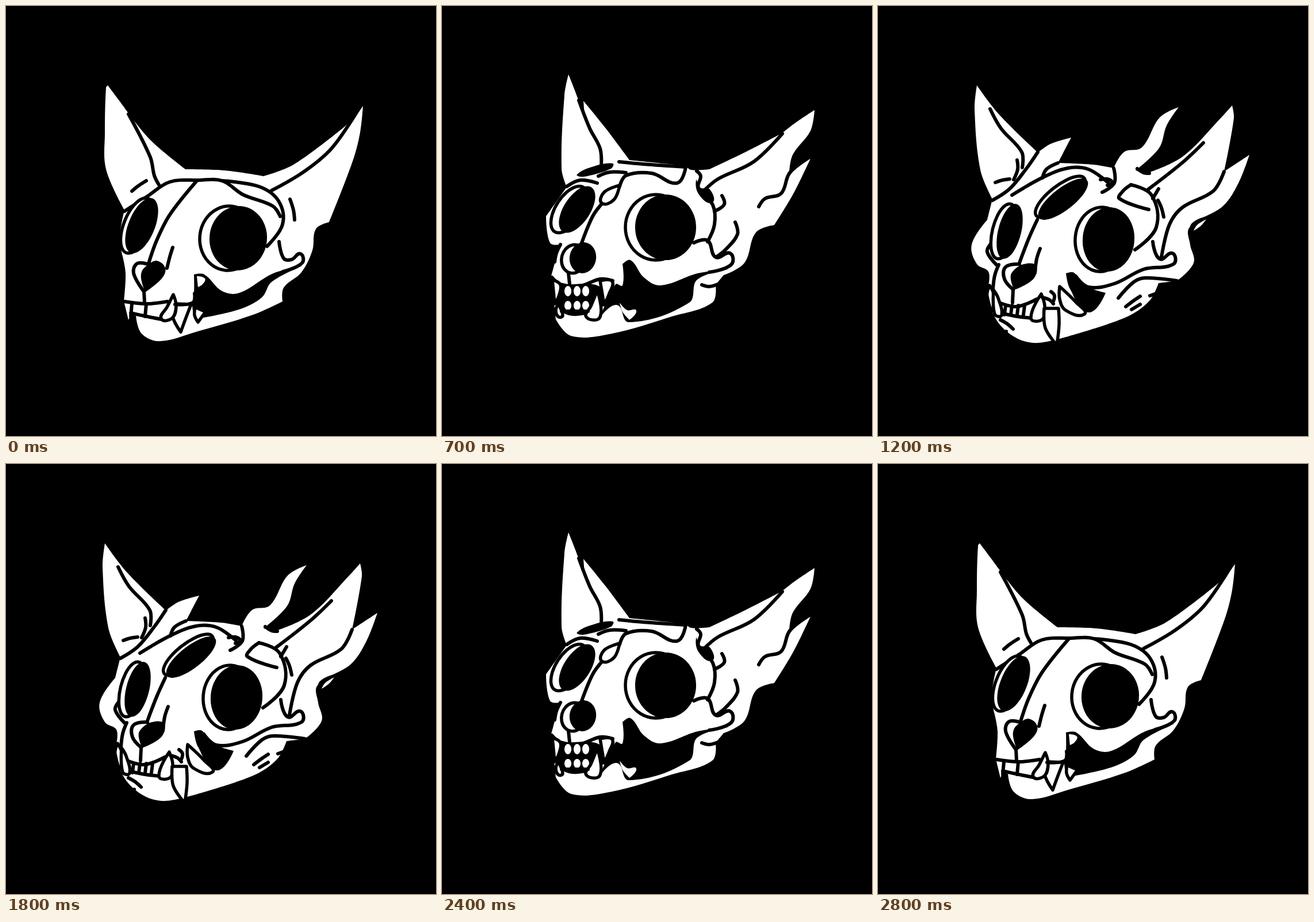
These frames come from a looping animation (748 by 748 pixels, 3.2 s). An HTML page:

```html
<!DOCTYPE html>
<html lang="en">
<head>
<meta charset="utf-8">
<title>Cat skull</title>
<style>
html, body { margin: 0; width: 100%; height: 100%; overflow: hidden; background: #000; }
svg { display: block; width: 100vw; height: 100vh; }
path { stroke-linecap: round; stroke-linejoin: round; }
</style>
</head>
<body>
<svg id="stage" viewBox="0 0 748 748"></svg>
<script>
const paints = {
  white: 'fill="#fff"',
  black: 'fill="#000"',
  rimmed: 'fill="#fff" stroke="#000" stroke-width="5.5"',
  line: 'fill="none" stroke="#000" stroke-width="6"'
};
let markup = '';
let moves = [];

// Points are written "x y"; "!" marks a sharp corner.
const parse = text => [...text.matchAll(/(\d+) (\d+)(!?)/g)]
  .map(m => ({ x: +m[1], y: +m[2], sharp: !!m[3] }));

// Moves a point along with the nearby anchors.
function warp(p, { from, to, amount }) {
  const targets = parse(to.anchors);
  let dx = 0, dy = 0, sum = 0;
  parse(from.anchors).slice(0, targets.length).forEach((a, i) => {
    if (!targets[i]) return;
    const weight = 1 / ((p.x - a.x) ** 2 + (p.y - a.y) ** 2 + 300);
    dx += weight * (targets[i].x - a.x);
    dy += weight * (targets[i].y - a.y);
    sum += weight;
  });
  return { x: p.x + amount * dx / sum, y: p.y + amount * dy / sum, sharp: p.sharp };
}

function smooth(points, open) {
  const n = points.length;
  const at = i => points[(i + n) % n];
  const handle = (i, length) => {
    const p = at(i);
    if (p.sharp || open && (i === 0 || i === n - 1)) return { x: 0, y: 0 };
    const a = at(i - 1), b = at(i + 1);
    const k = length * 0.35 / (Math.hypot(b.x - a.x, b.y - a.y) || 1);
    return { x: (b.x - a.x) * k, y: (b.y - a.y) * k };
  };
  const show = (x, y) => x.toFixed(1) + ' ' + y.toFixed(1);
  let d = 'M' + show(points[0].x, points[0].y);
  for (let i = 0; i < (open ? n - 1 : n); i++) {
    const a = at(i), b = at(i + 1);
    const length = Math.hypot(b.x - a.x, b.y - a.y);
    const u = handle(i, length), v = handle(i + 1, length);
    d += 'C' + [show(a.x + u.x, a.y + u.y), show(b.x - v.x, b.y - v.y), show(b.x, b.y)].join(' ');
  }
  return open ? d : d + 'Z';
}

function add(paint, points) {
  const moved = points.map(p => moves.reduce(warp, p));
  markup += `<path ${paints[paint]} d="${smooth(moved, paint === 'line')}"/>`;
}
const white = text => add('white', parse(text));
const black = text => add('black', parse(text));
const fang = text => add('rimmed', parse(text));
const line = text => add('line', parse(text));

function oval(paint, x, y, rx, ry, tilt = 0) {
  const turn = tilt * Math.PI / 180, c = Math.cos(turn), s = Math.sin(turn);
  add(paint, Array.from({ length: 12 }, (_, i) => {
    const a = i * Math.PI / 6, u = rx * Math.cos(a), v = ry * Math.sin(a);
    return { x: x + u * c - v * s, y: y + u * s + v * c };
  }));
}

// A socket with a pale rim showing beside it.
function eye(x, y, rx, ry, tilt, shift, lift = 0) {
  oval('rimmed', x + shift, y + lift, rx, ry, tilt);
  oval('black', x, y, rx, ry, tilt);
}

function gaps(x, y, step, count, height) {
  for (let i = 0; i < count; i++) {
    line(`${x + i * step} ${y} ${x + i * step - 2} ${y + height}`);
  }
}

// Anchors: ear tips and bases, eyes, nose, hinge, chin, jaw corner, then flames and cheeks.
const calm = {
  anchors: '177 138 312 284 621 174 448 296 232 382 400 405 256 468 516 440 262 583 480 512',
  draw() {
    white('177 138! 198 166 214 188! 252 234 312 284! 380 286 448 296! 500 276 584 214! 599 200 612 178! 614 184! 621 174! 616 220 603 270 562 376! 539 388 533 425 514 463 483 490 481 514! 430 537 330 567 268 583 236 570 226 539! 217 536! 213 546! 205 513! 208 465 202 432! 198 400 206 355! 174 284 172 220 174 142');
    line('213 188 251 263 258 295 266 311');
    line('219 322 230 313 244 304');
    line('494 336 500 355 502 372');
    line('613 180 567 247 520 287 462 321');
    line('206 357 246 331 285 306 335 303 376 304 412 328 464 348 477 366');
    line('376 304 440 314 474 339 481 380 454 418');
    eye(236, 382, 23, 51, 22, -8);
    line('332 304 285 363 262 408 248 448');
    line('246 449 228 448 222 465 240 497');
    black('247 450! 262 443 277 456 271 474 242 498! 235 474 237 460');
    line('240 496 241 516');
    line('290 420 285 436 280 456');
    eye(404, 404, 50, 56, 6, -17);
    line('475 410 483 439 497 441 512 431 515 447 482 462');
    black('327 467! 345 467 376 496 406 499 465 465 515 452! 462 480 445 507 405 528 328 545! 324 520 327 500');
    white('332 470! 346 474 342 484 334 489!');
    fang('329 524! 328 538 334 550! 347 532!');
    line('206 514 245 518 281 514');
    line('217 534 240 539 270 545');
    gaps(219, 518, 12.5, 4, 22);
    fang('295 518! 290 540 304 567! 312 545 322 519!');
    fang('291 502! 296 522 289 543 270 544 280 524');
    line('294 519 325 516 328 500');
  }
};

const cracked = {
  anchors: '220 119 322 268 648 181 465 284 235 353 388 385 245 438 506 440 230 576 475 510',
  draw() {
    white('220 119! 236 160 243 184! 248 190! 246 165! 285 213 326 268! 424 278! 433 285 465 284! 530 253 592 221! 615 203 648 181! 641 217 610 259 604 290! 643 261! 612 325 578 381! 546 394 526 447 490 468! 476 485! 470 516 400 540 295 570 225 574 198 545! 190 470! 205 415! 188 412 181 366! 217 315! 208 283 213 155');
    line('238 164 257 213 275 248 277 278');
    black('235 293 264 279 297 274 294 283 246 297');
    line('272 296 292 289 320 290');
    line('308 271 350 275 424 280');
    line('217 314 240 303 270 308');
    eye(235, 354, 23, 46, 33, -14);
    fang('309 312! 282 324 278 343 299 337');
    line('309 314 320 295 365 291 409 308 424 280');
    line('278 344 262 366 243 412');
    line('443 287 450 296 446 316 471 346 474 380 462 410');
    black('442 303 449 316 466 319 470 342 447 328');
    line('592 222 542 271 480 301 455 322');
    line('643 261 605 290 590 326 562 335 551 349');
    line('487 330 491 345 474 357');
    line('510 376 514 397 493 424 478 436');
    eye(389, 385, 53, 57, 0, -17);
    line('438 412 462 408 476 437 501 430 503 450 465 463');
    line('452 485 465 488 480 484');
    line('206 415 199 430 196 445');
    oval('rimmed', 229, 440, 21, 25, 15);
    oval('black', 245, 438, 23, 27, 10);
    line('220 465 222 484');
    black('314 449! 328 442 351 472 380 486 445 465 500 458! 444 476 430 516 325 550 304 520 275 542! 302 484 314 486');
    white('309 516! 314 532 326 546! 338 530 322 529');
    black('196 477! 208 484 270 486 284 510 268 532 208 532');
    line('191 472 206 484 240 487 275 475 297 478');
    for (const x of [219, 235, 250]) {
      oval('white', x, 496, 6, 9);
      oval('white', x, 521, 6, 8);
    }
    fang('192 476! 206 485 203 505 196 518!');
    fang('202 518! 210 538 203 541 198 530');
    fang('270 495! 275 541 251 541 259 522');
    fang('275 478! 296 479 291 500 282 520!');
    line('208 531 235 531 254 531');
  }
};

const burning = {
  anchors: '172 138 278 255 617 174 470 290 230 390 400 405 252 468 515 440 270 586 478 508 '
    + '336 229 523 176 440 312 646 259 320 337 163 415 192 486 380 555 319 578 380 491',
  draw() {
    horned();
    eye(322, 336, 19, 53, 52, -5, -4);
    eye(229, 392, 20, 49, 14, -10);
    eye(401, 406, 45, 56, 5, -13);
    black('327 465! 341 464 354 484 396 499! 366 533 334 492');
    line('301 497 307 504 304 516');
    fang('316 488! 345 516 359 536 326 529 316 510');
    line('206 514 240 523 276 510');
    line('218 535 242 540 268 543');
    gaps(222, 521, 11, 4, 16);
    fang('194 486! 201 500 204 530 190 505');
    fang('201 494! 209 508 215 538 203 536');
    fang('284 501! 290 522 286 545 266 543');
    fang('289 526! 314 526! 315 555 311 590! 291 560');
    line('286 507 298 511 305 518');
    line('213 546 225 553 235 562');
    line('223 566 221 579');
  }
};

// Everything but sockets and mouth, shared by both burning poses.
function horned() {
  white('172 138! 210 188 278 255! 300 240 336 229! 313 273! 375 276 410 282! 428 254 459 246 490 194 523 176! 502 208 489 247 448 286! 470 290! 530 262 598 193 616 173! 619 195 602 288! 646 259! 627 308 600 348 542 385 543 415 549 447 520 478! 488 482! 472 513 430 542 319 578! 270 586 230 571 200 535 192 486! 192 462 172 449 163 415 190 372! 199 336! 178 285 168 180');
  line('195 179 214 213 250 254 251 281');
  line('242 268 243 284 236 302');
  line('204 307 216 303 229 301');
  line('278 254 258 283 229 318 199 338');
  line('313 273 293 284 286 299');
  line('233 329 285 299 330 282 366 284 400 307');
  line('195 415 190 428 206 450');
  line('210 450 203 469 200 492');
  line('277 372 262 405 246 447');
  line('282 422 276 440 273 464');
  line('246 449 222 454 220 475 235 493');
  black('247 451! 273 450 271 474 237 494! 231 468');
  line('235 494 234 516');
  line('410 282 411 308 390 324');
  line('387 302 399 301 407 307 399 312');
  line('440 311 426 322 420 335 471 354');
  line('440 311 476 329 484 385 447 424');
  line('451 283 462 290 472 291');
  line('470 319 530 272 566 238');
  line('488 318 478 335');
  line('487 338 493 351 497 367');
  line('602 288 583 322 530 350 507 380 493 437');
  line('478 410 490 440 512 430 514 449 462 458 411 483 366 489 344 470');
  line('520 478 465 473 445 480 418 508');
  line('431 523 444 513 456 505');
  line('441 528 456 519');
  line('473 504 484 500');
  line('545 395 548 380 571 369');
  white('549 391! 555 381 571 371! 562 382');
}

const roaring = {
  anchors: '204 132 298 254 643 177 485 292 238 367 408 388 258 452 517 440 285 619 482 518 '
    + '335 238 512 198 432 323 660 267 328 326 167 405 204 482 380 582 320 614 392 485',
  draw() {
    moves.unshift({ from: burning, to: roaring, amount: 1 });
    horned();
    moves.shift();
    eye(328, 328, 18, 37, 50, -14, -4);
    eye(239, 369, 23, 51, 22, -15);
    eye(409, 388, 49, 47, 0, -12);
    black('338 440! 362 454 374 476 402 489 390 525 374 543 330 505! 342 478');
    white('344 446! 354 453 352 462 345 453');
    fang('328 505! 360 530 369 546 342 550 329 530');
    black('214 500! 290 500 303 530 288 580 232 570');
    for (const x of [228, 249, 266, 281]) oval('white', x, 511, 6, 7);
    for (const x of [241, 257, 274]) oval('white', x, 571, 6, 8);
    line('218 501 255 502 292 494');
    line('225 572 250 577 292 585');
    fang('216 540! 224 560 226 574 210 568');
    fang('294 540! 309 578 302 589 287 582');
    fang('293 493! 305 482 318 488 322 520 314 558!');
    fang('206 489! 222 500 216 522 209 556! 202 526');
    line('305 601 322 599 335 587');
    line('226 583 243 594');
  }
};

function picture(pose, to = pose, amount = 0) {
  markup = '';
  moves = [{ from: pose, to, amount }];
  pose.draw();
  return markup;
}

// The first half of the loop; the second half runs it backwards.
const steps = [
  [0, picture(calm)],
  [400, picture(calm, cracked, 0.35)],
  [500, picture(calm, cracked, 0.72)],
  [600, picture(cracked, calm, 0.12)],
  [700, picture(cracked)],
  [800, picture(roaring, cracked, 0.4)],
  [900, picture(roaring)],
  [1000, picture(roaring, burning, 0.35)],
  [1100, picture(burning, roaring, 0.3)],
  [1200, picture(burning)],
  [1400, picture(burning, roaring, 0.03)]
];

const stage = document.getElementById('stage');
const loop = 3200;
let shown = -1;

function render(time) {
  const t = time % loop;
  const folded = t < loop / 2 ? t : loop - t - 0.001;
  const index = steps.filter(([start]) => start <= folded).length - 1;
  if (index !== shown) stage.innerHTML = steps[shown = index][1];
}

const begin = performance.now();
function tick() {
  render(performance.now() - begin);
  requestAnimationFrame(tick);
}
tick();
</script>
</body>
</html>
```
